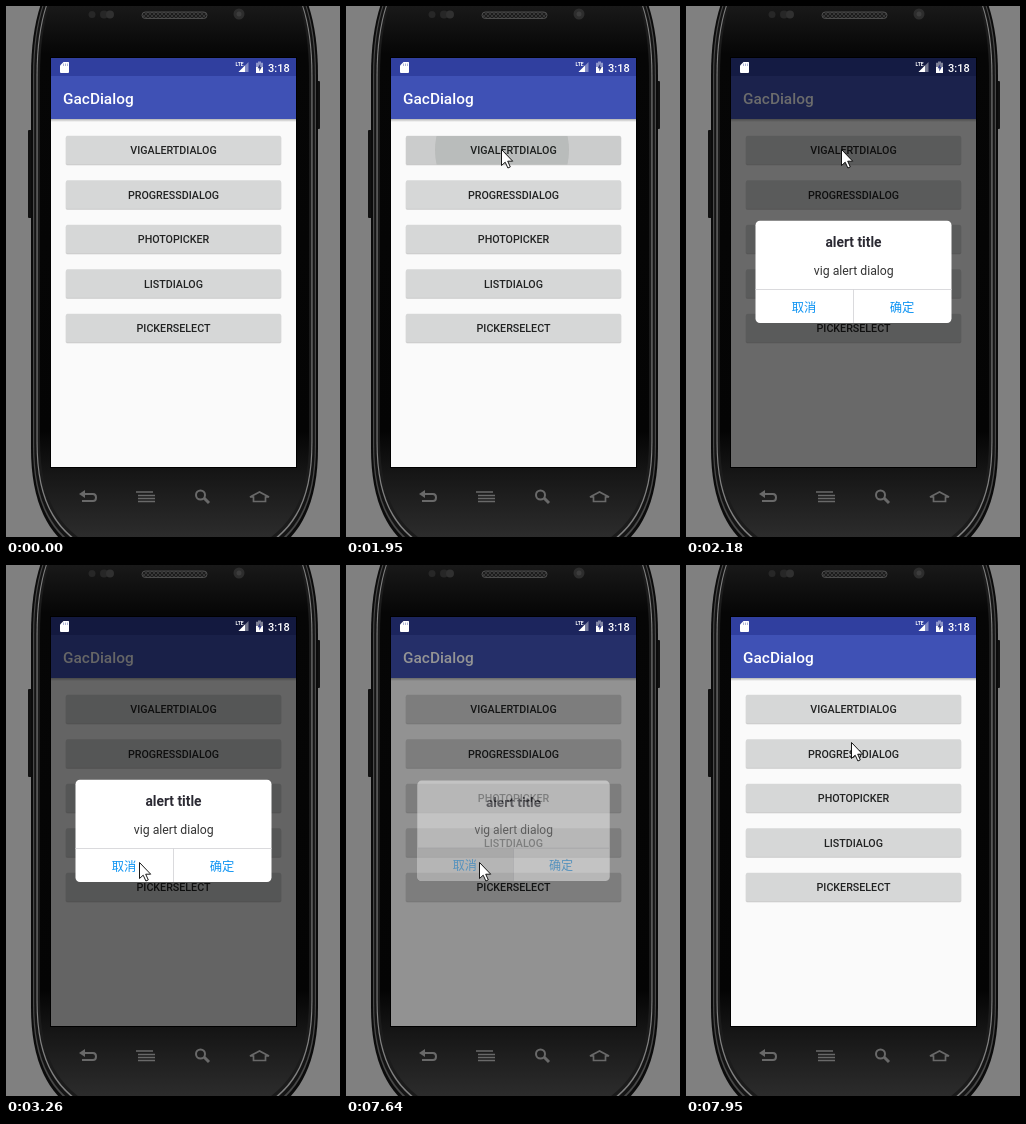
Animation of 334 by 531 pixels, one loop 8 s. Source, as an HTML page:

```html
<!DOCTYPE html>
<html lang="zh-CN">
<head>
<meta charset="utf-8">
<title>Dialog demo</title>
<style>
html, body { margin: 0; width: 100%; height: 100%; overflow: hidden; background: #808080; }
svg { display: block; width: 100%; height: 100%; }
text { font-family: Roboto, "Noto Sans CJK SC", "Noto Sans CJK", sans-serif; }
.mid { text-anchor: middle; }
.label { font-size: 10.7px; font-weight: 500; fill: #212222; }
.choice { font-size: 12.3px; fill: #0d93f2; }
</style>
</head>
<body>
<svg viewBox="0 0 334 531">
  <defs>
    <linearGradient id="face" gradientUnits="userSpaceOnUse" x1="0" y1="0" x2="0" y2="531">
      <stop stop-color="#191919"/><stop offset=".09" stop-color="#060606"/>
      <stop offset=".8" stop-color="#040404"/><stop offset=".88" stop-color="#161616"/>
      <stop offset="1" stop-color="#2c2c2c"/>
    </linearGradient>
    <linearGradient id="drop" x2="0" y2="1">
      <stop stop-opacity=".28"/><stop offset="1" stop-opacity="0"/>
    </linearGradient>
    <pattern id="mesh" width="4" height="4" patternUnits="userSpaceOnUse">
      <rect width="4" height="4" fill="#1c1c1c"/><path d="M0 0L4 4M4 0L0 4" stroke="#444" stroke-width=".7"/>
    </pattern>
    <clipPath id="firstButton"><rect x="60" y="130" width="215" height="28.5" rx="1.5"/></clipPath>
    <clipPath id="card"><rect x="69.500" y="214.700" width="196" height="102.300" rx="4.500"/></clipPath>
  </defs>

  <rect x="22" y="124" width="5" height="88" rx="1" fill="#111"/>
  <rect x="309" y="75" width="5" height="48" rx="1" fill="#111"/>
  <g id="body"></g>

  <circle cx="86" cy="8.500" r="3.500" fill="#272727"/>
  <circle cx="98" cy="8.500" r="4" fill="#272727"/>
  <circle cx="104" cy="8.500" r="4" fill="#303030"/>
  <rect x="136" y="6" width="65" height="6.500" rx="3.200" fill="url(#mesh)" stroke="#4c4c4c"/>
  <circle cx="233" cy="8" r="5.500" fill="#2d2d2d"/>
  <circle cx="233" cy="8" r="2.500" fill="#3d3d3d"/>

  <g fill="none" stroke="#696969" stroke-width="2">
    <path d="M77 488H87Q90 488 90 491.500T87 495H76"/>
    <path d="M73 488L79 484V492Z" fill="#696969" stroke="none"/>
    <path d="M130 486H147M132 489.500H149M132 492.500H149M132 495.500H149" stroke-width="1.500"/>
    <circle cx="194.500" cy="489" r="4.500"/><path d="M198 492L203 497" stroke-width="3"/>
    <path d="M244 491L253.500 486L263 491H259.500V495.500H247.500V491Z" stroke-width="1.700"/>
  </g>

  <rect x="44" y="51" width="247" height="411" fill="#000"/>
  <rect x="45" y="52" width="245" height="409" fill="#fafafa"/>
  <rect x="45" y="52" width="245" height="18" fill="#303f9f"/>
  <rect x="45" y="70" width="245" height="43" fill="#3f51b5"/>
  <rect x="45" y="113" width="245" height="3" fill="url(#drop)"/>
  <text x="57" y="98" font-size="15.400" font-weight="500" fill="#fff">GacDialog</text>
  <g id="buttons"></g>
  <g id="ripple" clip-path="url(#firstButton)">
    <rect x="60" y="130" width="215" height="29" fill-opacity=".05"/>
    <circle id="wave" cx="156" cy="144" fill="#0a1a14" fill-opacity=".09"/>
  </g>
  <rect id="scrim" x="45" y="52" width="245" height="409"/>

  <g fill="#fff">
    <path d="M57.500 56H62.500Q63 56 63 57V66Q63 67 62 67H55Q54 67 54 66V59.500Z"/>
    <path d="M57.500 57.500V60M59.500 57.500V60M61.500 57.500V60" stroke="#9ba2cc" stroke-width=".8"/>
    <text x="229.500" y="60" font-size="5" font-weight="700">LTE</text>
    <path d="M242.500 56V66H232.500Z" fill-opacity=".4"/>
    <path d="M239 59.500V66H232.500Z"/>
    <path d="M252 55.500H255V56.800H257V67H250V56.800H252Z" fill-opacity=".45"/>
    <path d="M250 61H257V67H250Z"/>
    <path d="M254.200 57.800L251.600 62.300H253.300V65.500L255.700 61H254.200Z" fill="#303a80"/>
    <text x="262" y="65.500" font-size="11" font-weight="500">3:18</text>
  </g>

  <g id="dialog">
    <g clip-path="url(#card)">
      <rect x="69" y="214" width="197" height="103" fill="#fff"/>
      <rect id="pressed" x="69" y="283" width="99" height="34" fill="#e0e0e0"/>
      <path d="M69 283.500H266M167.500 283V317" stroke="#d6d6da" stroke-width=".9"/>
    </g>
    <text class="mid" x="167.500" y="241.300" font-size="13.800" font-weight="700" fill="#2b2a33">alert title</text>
    <text class="mid" x="167.800" y="269" font-size="12.250" fill="#333">vig alert dialog</text>
    <text class="mid choice" x="118" y="305.500">取消</text>
    <text class="mid choice" x="216" y="305.500">确定</text>
  </g>

  <path id="cursor" d="M.5 .5V16.500L4.200 13.200L6.900 19L9.300 17.900L6.700 12.200H11.700Z" fill="#fff" stroke="#000" stroke-width=".9"/>
</svg>
<script>
const $ = id => document.getElementById(id);
const clamp = (v, lo, hi) => Math.min(hi, Math.max(lo, v));

// Phone rim: nested outlines, each inset further than the last
function outline(i) {
  const side = 25 + i, corner = 56 + 2.4 * i;
  const right = x => 337 - x;
  return `M${36 + i} -5C${29 + i} 14 ${side} 38 ${side} 70V${442 - i}
    C${side} 482 ${34 + 1.3 * i} 514 ${corner} 535H${right(corner)}
    C${right(34 + 1.3 * i)} 514 ${right(side)} 482 ${right(side)} ${442 - i}V70
    C${right(side)} 38 ${right(29 + i)} 14 ${right(36 + i)} -5Z`;
}
$('body').innerHTML = [[0, '#0b0b0b'], [2, '#484848'], [3.2, '#141414'], [5.5, '#808080'], [6.6, '#1b1b1b'], [9, 'url(#face)']]
  .map(([inset, color]) => `<path d="${outline(inset)}" fill="${color}"/>`).join('');

$('buttons').innerHTML = ['VIGALERTDIALOG', 'PROGRESSDIALOG', 'PHOTOPICKER', 'LISTDIALOG', 'PICKERSELECT']
  .map((name, i) => `<g transform="translate(0 ${44.5 * i})">
    <rect x="59.500" y="130.500" width="216" height="29" rx="2" fill-opacity=".1"/>
    <rect x="60" y="131" width="215" height="28" rx="1.500" fill-opacity=".1"/>
    <rect x="60" y="129.700" width="215" height="28.600" rx="1.500" fill="#d6d7d7"/>
    <text class="mid label" x="167.500" y="148">${name}</text></g>`).join('');

// Number of screen updates shown by time t, for n updates spread from a to b
const updates = (t, a, b, n) => t < a ? 0 : Math.min(n, Math.floor((t - a) / (b - a) * (n - 1) + 0.1) + 1);

function pointer(t, open, close) {
  const legs = [
    [267, 229, (updates(t, 70, 180, 4) - 1) / 3],
    [155, 143, updates(t, 630, 1090, 7) / 7],
    [207, 184, clamp((open - 5) / 6, 0, 1)],
    [133, 297, updates(t, 2720, 3260, 8) / 8],
    [165, 177, clamp((close - 2) / 3, 0, 1)]
  ];
  let x = 230, y = 308;
  for (const [tx, ty, p] of legs) {
    x += (tx - x) * p;
    y += (ty - y) * p;
  }
  return `translate(${Math.round(x)} ${Math.round(y)})`;
}

function draw(now) {
  const t = now % 8000;
  const open = updates(t, 1870, 2640, 11);
  const close = updates(t, 7640, 7950, 5);

  $('cursor').style.visibility = t < 70 ? 'hidden' : 'visible';
  $('cursor').setAttribute('transform', pointer(t, open, close));

  $('wave').setAttribute('r', 15 + 26 * open);
  $('ripple').setAttribute('opacity', open ? clamp((5 - open) / 2, 0, 1) : 0);

  const dim = close ? 0.64 - 0.22 * close : 0.136 + 0.22 * (open - 3);
  $('scrim').setAttribute('opacity', open ? clamp(dim, 0, 0.6) : 0);

  const alpha = close ? (close < 2 ? 0.45 : 0) : open < 3 ? 0 : open < 4 ? 0.87 : 1;
  const scale = alpha < 1 ? 0.982 : 1;
  $('dialog').setAttribute('opacity', alpha);
  $('dialog').setAttribute('transform', `translate(167.5 265.5) scale(${scale}) translate(-167.5 -265.5)`);
  $('pressed').setAttribute('opacity', t >= 7480 ? 1 : 0);
}

const start = performance.now();
function frame() {
  draw(performance.now() - start);
  requestAnimationFrame(frame);
}
frame();
</script>
</body>
</html>
```
